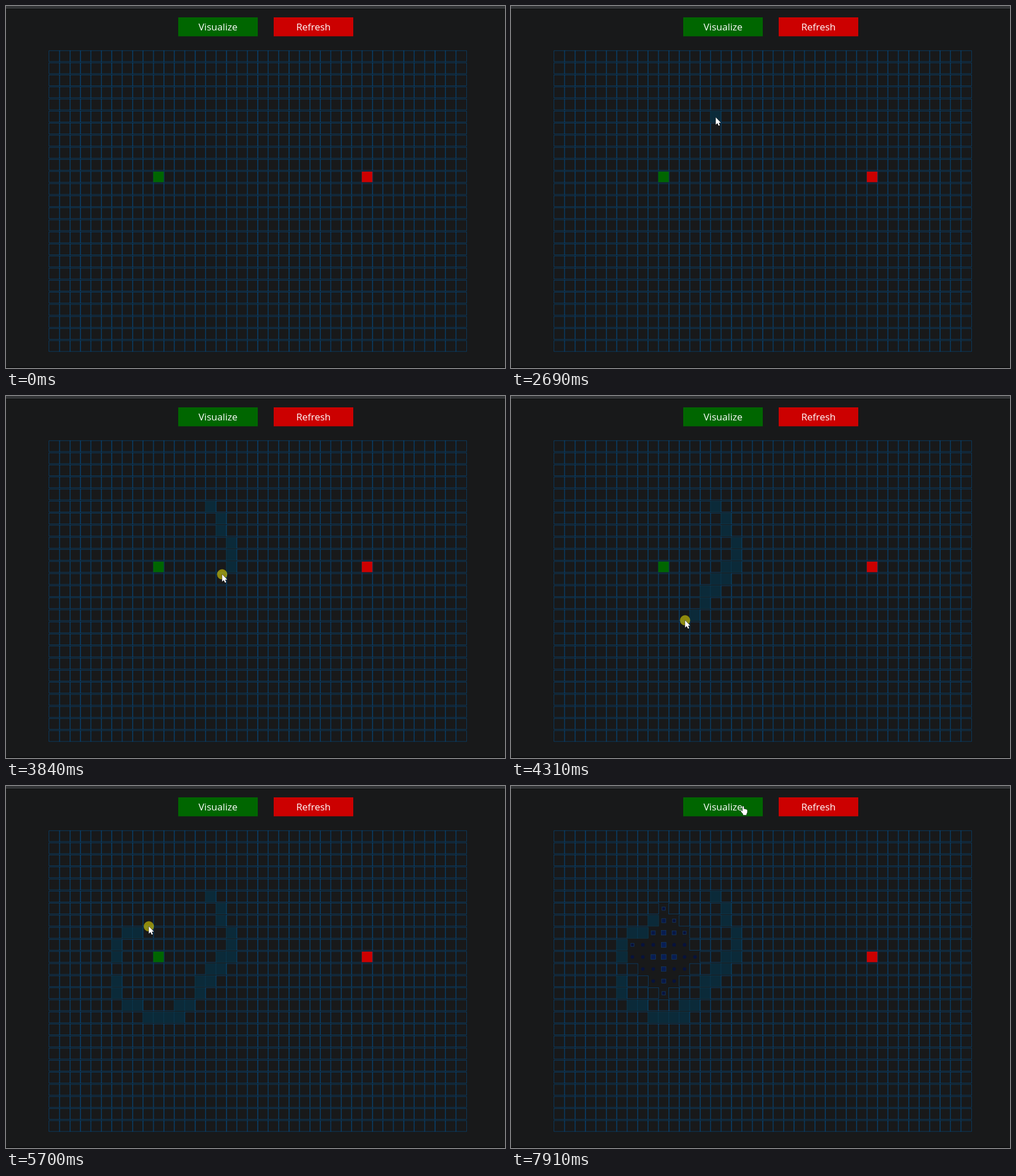
An HTML page with a canvas for the animation above (8000 ms loop, 878 by 638 pixels).

```html
<!DOCTYPE html>
<html lang="en">
<head>
<meta charset="utf-8">
<title>Pathfinding grid</title>
<style>
  html, body { margin: 0; width: 100%; height: 100%; overflow: hidden; background: #18191a; }
  canvas { display: block; }
</style>
</head>
<body>
<canvas id="stage" width="878" height="638"></canvas>
<script>
const ctx = document.getElementById('stage').getContext('2d');
const LOOP = 8000, STEP = 77, COLS = 40, ROWS = 25;
const CELL = 18.35, ROW = 21.29, EDGE = 0.73, LEFT = 76, TOP = 79.2;
const SEARCH_START = 7625, NODE_DELAY = 10, WALL_DELAY = 75;
const start = { c: 10, r: 10 }, goal = { c: 30, r: 10 };
const cellX = c => LEFT + c * CELL;
const cellY = r => TOP + r * ROW;

// Pointer strokes: start time, end time, key points evenly spaced in time
const strokes = [
  [230, 1030, [[711, 485], [430, 280], [358, 202]]],
  [1090, 1410, [[358, 201], [359, 195]]],
  [1740, 1890, [[359, 195], [359, 195]]],
  [2690, 2900, [[360, 196], [387, 214]]],
  [3150, 3910, [[386, 216], [377, 217], [390, 252], [397, 293], [369, 324]]],
  [3990, 4780, [[354, 335], [342, 367], [306, 395], [280, 407], [250, 405], [224, 385]]],
  [4860, 5010, [[206, 384], [194, 342]]],
  [5085, 5160, [[194, 306], [193, 305]]],
  [5400, 6010, [[194, 286], [212, 254], [251, 247], [256, 240], [256, 242]]],
  [6420, 7220, [[258, 238], [345, 135], [399, 55]]],
  [7300, 7910, [[405, 40], [407, 35], [407, 35]]]
];
const presses = [[1740, 1880], [3340, 5970], [7500, 7600]];
const isPressed = t => presses.some(([from, to]) => t >= from && t < to);
const stepOf = ([from, to]) => (to - from) / Math.round((to - from) / STEP);

// Smooth curve through the key points, u from 0 to 1
function along(points, u) {
  const last = points.length - 1;
  const i = Math.min(Math.floor(u * last), last - 1), k = u * last - i;
  const at = n => points[Math.max(0, Math.min(last, n))];
  return [0, 1].map(axis => {
    const [a, b, c, d] = [-1, 0, 1, 2].map(n => at(i + n)[axis]);
    const ease = k * k * (3 - 2 * k);
    return b + (c - b) * ease + (c - a) / 2 * k * (1 - k) ** 2 - (d - b) / 2 * k * k * (1 - k);
  });
}

function pointerAt(t) {
  const [from, to, points] = strokes.findLast(s => s[0] <= t) || strokes[0];
  return along(points, Math.min(1, Math.max(0, (t - from) / (to - from))));
}

// The screen holds still between the pointer's updates
function snap(t) {
  const stroke = strokes.findLast(s => s[0] <= t);
  if (!stroke) return 0;
  const step = stepOf(stroke);
  return Math.min(stroke[1], stroke[0] + Math.floor((t - stroke[0]) / step) * step);
}

// A pressed pointer builds a wall in every cell it is sampled in
const walls = new Map();
for (const stroke of strokes) {
  const half = stepOf(stroke) / 2;
  for (let t = stroke[0]; t < stroke[1] + 1; t += half) {
    const [x, y] = pointerAt(t);
    const c = Math.floor((x - LEFT) / CELL), r = Math.floor((y - TOP + 0.9) / ROW);
    const key = c + ',' + r;
    if (isPressed(t) && !walls.has(key)) walls.set(key, t + WALL_DELAY);
  }
}

// Search order: nearest cells first, then top to bottom
const search = [];
for (let r = 0; r < ROWS; r++) for (let c = 0; c < COLS; c++) {
  const dx = c - start.c, dy = r - start.r, d = Math.abs(dx) + Math.abs(dy), key = c + ',' + r;
  if (d > 4 || walls.has(key)) continue;
  const outlined = d === 4 || dx === 0 || (Math.abs(dx) === 1 && dy % 2 === 0 && dy < 1);
  search.push({ key, d, outlined });
}
search.sort((a, b) => a.d - b.d);
const visits = new Map(search.map((n, i) => [n.key, { ...n, time: SEARCH_START + i * NODE_DELAY }]));

function box(color, x, y, w, h) {
  ctx.fillStyle = color;
  ctx.fillRect(x, y, w, h);
}

function disc(color, x, y, radius) {
  ctx.fillStyle = color;
  ctx.beginPath();
  ctx.arc(x, y, radius, 0, 7);
  ctx.fill();
}

function outline(color, x, y, size) {
  ctx.strokeStyle = color;
  ctx.lineWidth = EDGE;
  ctx.strokeRect(x, y, size, size);
}

function button(x, color, label) {
  box(color, x, 20, 140, 33.4);
  ctx.fillStyle = '#fff';
  ctx.font = '17px "Open Sans", "Noto Sans", sans-serif';
  ctx.textAlign = 'center';
  ctx.fillText(label, x + 70, 43);
}

function drawVisit(x, y, { outlined }, age) {
  const cx = x + CELL / 2, cy = y + CELL / 2;
  if (!outlined) return disc('#07123c', cx, cy, CELL * 0.17);
  const size = CELL * (0.3 + 0.7 * age / 1125);
  box(`rgb(8,${16 + age / 20},${56 + age / 10})`, cx - size / 2, cy - size / 2, size, size);
  outline('#153c68', cx - size / 2, cy - size / 2, size);
}

function drawCell(c, r, t) {
  const x = cellX(c), y = cellY(r), key = c + ',' + r;
  const visit = visits.get(key);
  if (visit && t >= visit.time) return drawVisit(x, y, visit, t - visit.time);
  const isWall = t >= walls.get(key);
  if (isWall) box('#0b2a39', x, y, CELL, CELL);
  outline(isWall ? '#0a3d56' : '#064677', x - EDGE / 2, y - EDGE / 2, CELL + EDGE);
}

const marker = (color, { c, r }) => box(color, cellX(c) - 0.4, cellY(r) - 0.2, CELL + 0.2, CELL + 0.2);

const arrow = new Path2D('M0 0V13L3 10.3L5 14.8L7.2 13.9L5.3 9.5H9Z');
const hand = new Path2D('M0 1Q1.2-.6 2.4 1V5.2Q3.7 4.3 4.6 5.6Q6 4.9 6.7 6.2Q8.2 5.8 8.4 7.4V11Q8 12.8 7 14V16H1V14L-3 9.5Q-3.2 7.6-1.5 8L0 9.5Z');

function drawPointer(t) {
  const [x, y] = pointerAt(t).map(Math.round);
  if (isPressed(t)) disc('rgba(255,240,0,.52)', x + 0.3, y + 0.3, 9);
  const shape = y < 53 ? hand : arrow;
  ctx.save();
  ctx.translate(x + 0.3, y + 0.3);
  ctx.fillStyle = '#fff';
  ctx.strokeStyle = '#000';
  ctx.lineWidth = 1;
  ctx.stroke(shape);
  ctx.fill(shape);
  ctx.restore();
}

function draw(t) {
  box('#18191a', 0, 0, 878, 638);
  box('#323436', 0, 0, 878, 5);
  box('#0b0c0c', 0, 5, 878, 1);
  box('#0e0f10', 0, 636, 878, 2);
  button(303, '#006600', 'Visualize');
  button(471, '#cc0000', 'Refresh');
  for (let r = 0; r < ROWS; r++) for (let c = 0; c < COLS; c++) drawCell(c, r, t);
  if (t < SEARCH_START) marker('#006600', start);
  marker('#cc0000', goal);
  if (t >= strokes[0][0]) drawPointer(t);
}

let shown = -1;
function tick() {
  const t = snap(performance.now() % LOOP + 10);
  if (t !== shown) draw(shown = t);
  requestAnimationFrame(tick);
}
tick();
</script>
</body>
</html>
```
